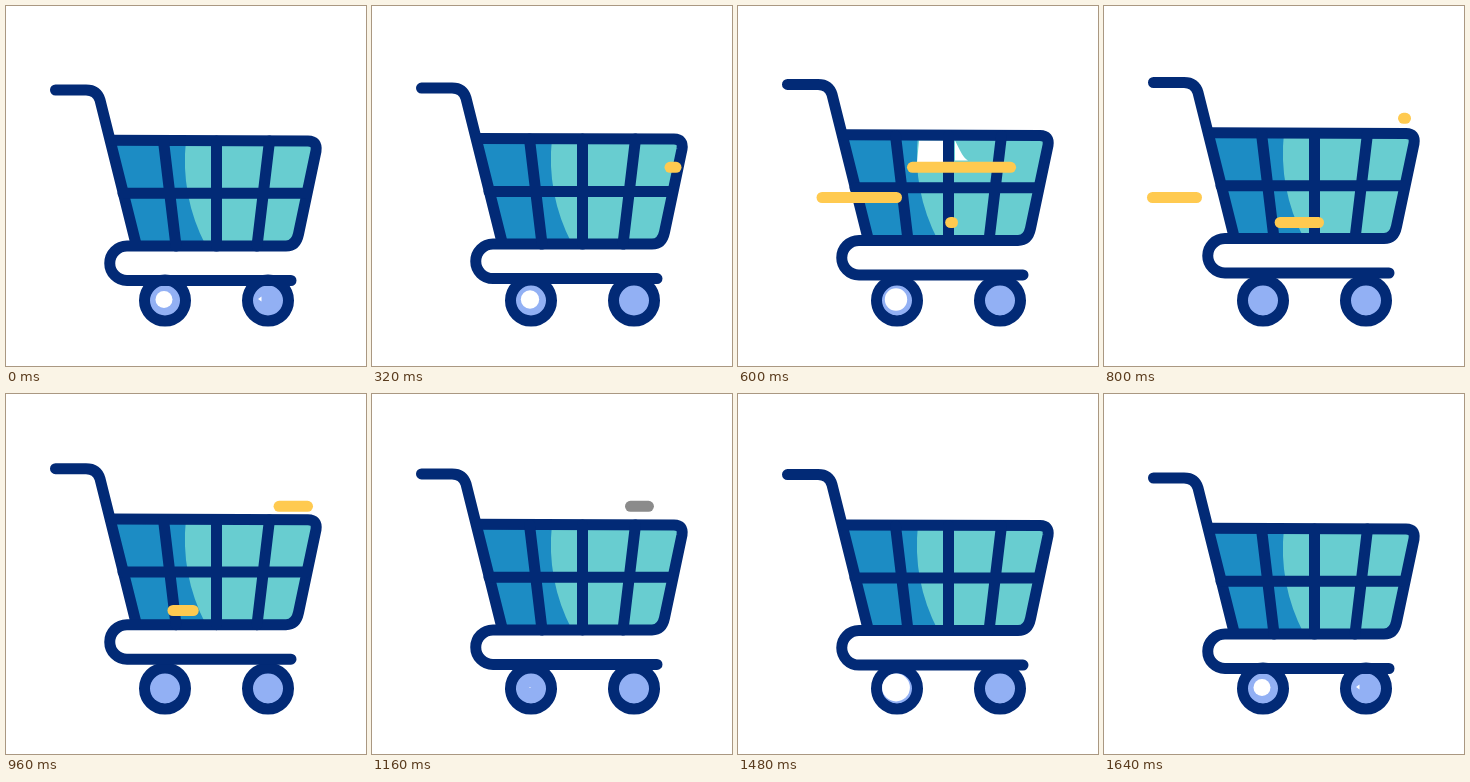
Animation, 360 px wide and 360 px high, one loop 2 s. Source, as an HTML page:

```html
<!DOCTYPE html>
<html lang="en">
<head>
<meta charset="utf-8">
<title>Shopping cart</title>
<style>
  html, body { margin: 0; width: 100%; height: 100%; overflow: hidden; background: #fff; }
  svg { display: block; width: 100vw; height: 100vh; }
  .frame { fill: none; stroke: #022a76; stroke-width: 11; stroke-linecap: round; stroke-linejoin: round; }
  #dashes { stroke: #ffca50; stroke-width: 11; stroke-linecap: round; }
</style>
</head>
<body>
<svg viewBox="0 0 360 360">
  <g id="wheels">
    <g fill="#92b0f4" stroke="#022a76" stroke-width="11">
      <circle cx="159" cy="294.5" r="20.500"/>
      <circle cx="262" cy="294.5" r="20.500"/>
    </g>
    <circle id="shine" cx="158" cy="293.5" fill="#fff"/>
    <path id="glint" fill="#fff" d="M252 293l3.5-2.500v5z"/>
  </g>
  <g id="cart">
    <path fill="#68cdd0" d="M104 134H304Q312 136 310 146L293 228Q290 240 281 240H131z"/>
    <path fill="#1c8cc4" d="M104 134H180Q174 190 200 240H131z"/>
    <path id="flash" fill="#fff" d="M181 140H205V162H179zM217 140L222 150Q226 158 230 160H217z"/>
    <g class="frame">
      <path d="M49.500 84H80Q91 84 94 94L130 238"/>
      <path d="M104.500 134.300L302 135Q311.500 135 310 145L292.500 228Q290 240 280 240H121A17 17 0 0 0 121 274.500H285"/>
      <path d="M117 187.300H300M157.500 135L170 240M210.500 135V240M263.500 135L251 240"/>
    </g>
  </g>
  <g id="dashes"></g>
</svg>
<script>
const LOOP = 2000, STEP = 40;
const MOVE_START = 240, MOVE_END = 1640;
const $ = id => document.getElementById(id);
const clamp = v => Math.min(1, Math.max(0, v));
const mix = (a, b, k) => a + (b - a) * k;
const ease = k => (1 - Math.cos(Math.PI * clamp(k))) / 2;
const wave = (t, peak, period) => Math.cos(2 * Math.PI * (t - peak) / period);
const show = (el, on) => el.setAttribute("visibility", on ? "visible" : "hidden");

// Speed lines: the head runs ahead, then the tail catches up
const HEAD_TIME = 260, TAIL_DELAY = 235;
const dashes = [
  { start: 308, y: 161.3, from: 304, to: 174.5 },
  { start: 424, y: 191.5, from: 158.5, to: 48.5 },
  { start: 590, y: 216.5, from: 214.5, to: 167 },
  { start: 788, y: 112.3, from: 301.5, to: 258.5, tailColor: "#8b8b8b" }
];
for (const d of dashes) {
  d.el = document.createElementNS("http://www.w3.org/2000/svg", "line");
  d.el.setAttribute("y1", d.y);
  d.el.setAttribute("y2", d.y);
  $("dashes").append(d.el);
}

function drawDash({ el, start, from, to, tailColor }, t) {
  const age = t - start;
  const head = clamp(age / HEAD_TIME);
  const tail = clamp((age - TAIL_DELAY) / TAIL_DELAY);
  el.setAttribute("x1", mix(from, to, head));
  el.setAttribute("x2", mix(from, to, tail));
  show(el, head > 0 && tail < 1);
  if (tailColor) el.style.stroke = tail > 0 ? tailColor : "";
}

function draw(t) {
  const moving = t > MOVE_START && t < MOVE_END;

  // Lift off, bob, settle
  const lift = ease((t - MOVE_START) / 200) * ease((MOVE_END - t) / 280);
  const y = -lift * (7 + 3.5 * wave(t, 460, 440));
  $("cart").setAttribute("transform", `translate(0 ${y.toFixed(2)})`);

  const r = moving ? 4 + 10 * wave(t, 480, 980) : 8.5;
  $("shine").setAttribute("r", Math.max(0, r));
  show($("glint"), !moving);
  show($("flash"), t >= 600 && t < 640);

  for (const d of dashes) drawDash(d, t);
}

function tick() {
  draw(Math.floor(performance.now() % LOOP / STEP) * STEP);
  requestAnimationFrame(tick);
}
tick();
</script>
</body>
</html>
```
